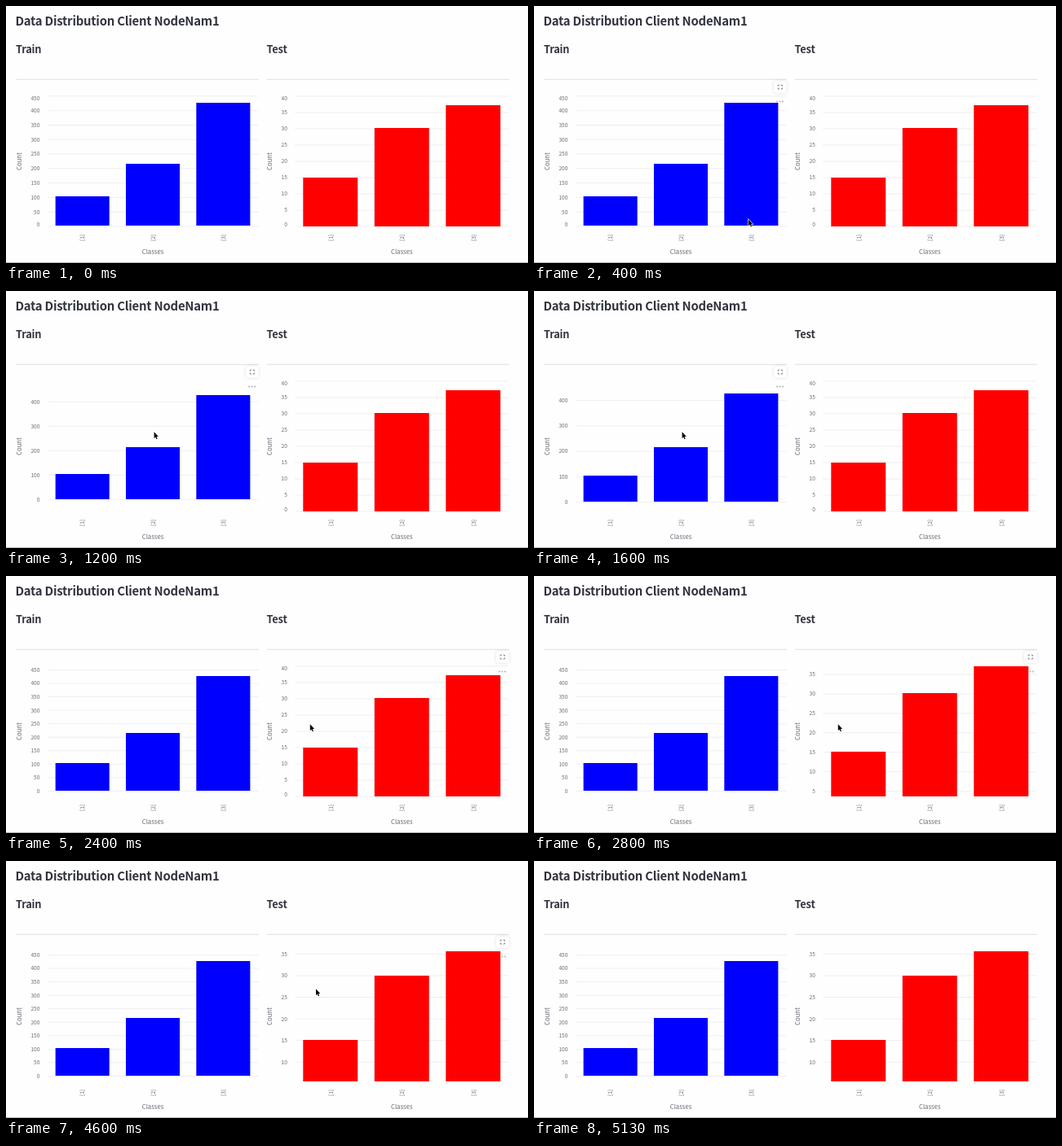
Recreate the animation shown at these times as an HTML page with a canvas. Size 640 by 316 pixels, loop 5.47 s.

```html
<!DOCTYPE html>
<html lang="en">
<head>
<meta charset="utf-8">
<title>Data Distribution</title>
<style>
  html, body { margin: 0; width: 100%; height: 100%; overflow: hidden; background: #fefefe; }
  canvas { display: block; width: 640px; height: 316px; }
</style>
</head>
<body>
<canvas id="stage" width="640" height="316"></canvas>
<script>
const ctx = document.getElementById('stage').getContext('2d');
const LOOP = 5470, TICK = 200;
const FONT = '"Source Sans Pro", "Noto Sans CJK JP", "Noto Sans CJK SC", "Noto Sans CJK KR", "Noto Sans CJK TC", "Noto Sans CJK", "Open Sans", sans-serif';
const INK = '#31333f', SOFT = '#666873', GRID = '#eeeff3';
const TOP = 110.9, BOTTOM = 271;

const progress = (t, from, to) => Math.min(1, Math.max(0, (t - from) / (to - from)));
const smooth = p => p * p * (3 - 2 * p);
const sineOut = p => Math.sin(p * Math.PI / 2);
const powerOut = (p, n) => 1 - (1 - p) ** n;

// zoom keeps the value under the pointer (pivot) at a fixed height (pivotY)
const charts = [
  { title: 'Train', x: 12, end: 310, plot: 50.5, color: '#0000ff',
    max: 450, values: [102, 214, 427], pivot: 264.2, pivotY: 177,
    hoverFrom: 200, hoverTo: 2400, dotsTo: 2400,
    zoom: t => 1 - .174 * smooth(progress(t, 600, 1400) ** .8) + .105 * sineOut(progress(t, 1400, 2000)) },
  { title: 'Test', x: 319.5, end: 617, plot: 354, color: '#ff0000',
    max: 40, values: [15, 30, 37], pivot: 22.375, pivotY: 181.5,
    hoverFrom: 2200, hoverTo: 4800, dotsTo: 5130,
    zoom: t => 1 + .327 * powerOut(progress(t, 2400, 3600), 2.27) }
];

// pointer way points: time, x, y
const path = [
  [200, 209, 300], [400, 263, 262.5], [600, 181.6, 173.3], [1800, 181.6, 173.3],
  [2000, 221, 187], [2400, 372.8, 182.3], [4400, 372.8, 182.3], [4600, 380, 157.3]
];

function pointerAt(t) {
  const i = path.findIndex(([time]) => time >= t);
  if (i < 0 || t < path[0][0]) return null;
  const b = path[i], a = path[Math.max(0, i - 1)];
  const p = a === b ? 0 : progress(t, a[0], b[0]);
  return [a[1] + (b[1] - a[1]) * p, a[2] + (b[2] - a[2]) * p];
}

function text(str, x, y, size, { align = 'left', color = SOFT, weight = 400, turn = 0, spacing = 0 } = {}) {
  ctx.save();
  ctx.translate(x, y);
  ctx.rotate(turn);
  ctx.font = `${weight} ${size}px ${FONT}`;
  ctx.letterSpacing = spacing + 'px';
  ctx.textAlign = align;
  ctx.fillStyle = color;
  ctx.fillText(str, 0, size * .365);
  ctx.restore();
}

function line(x1, x2, y, color, width) {
  ctx.fillStyle = color;
  ctx.fillRect(x1, y - width / 2, x2 - x1, width);
}

// round step from 1, 2, 5 or 10 that gives about seven intervals
function tickStep(span) {
  const raw = span / 7;
  const power = 10 ** Math.floor(Math.log10(raw));
  const e = raw / power;
  return power * (e >= Math.sqrt(50) ? 10 : e >= Math.sqrt(10) ? 5 : e >= Math.SQRT2 ? 2 : 1);
}

function drawDots(x) {
  ctx.fillStyle = '#b4b5ba';
  for (let i = -1; i <= 1; i++) {
    ctx.beginPath();
    ctx.arc(x - .3 + i * 3.5, 117.5, 1.05, 0, 7);
    ctx.fill();
  }
}

function drawIcon(x) {
  const y = 99.6;
  ctx.save();
  ctx.shadowColor = 'rgba(0,0,0,.13)';
  ctx.shadowBlur = 4;
  ctx.fillStyle = '#fff';
  ctx.beginPath();
  ctx.roundRect(x - 7.8, y - 7.2, 15.6, 14.4, 3);
  ctx.fill();
  ctx.shadowColor = 'transparent';
  ctx.strokeStyle = '#7b7e8b';
  ctx.beginPath();
  for (const sx of [-1, 1]) for (const sy of [-1, 1]) {
    ctx.moveTo(x + sx * 2.6, y + sy * .9);
    ctx.lineTo(x + sx * 2.6, y + sy * 2.4);
    ctx.lineTo(x + sx * .9, y + sy * 2.4);
  }
  ctx.stroke();
  ctx.restore();
}

function drawPointer(x, y) {
  const shape = [[0, 0], [0, 7.9], [1.7, 6.3], [2.9, 9], [4.1, 8.5], [3, 5.9], [5.2, 5.7]];
  ctx.beginPath();
  for (const [dx, dy] of shape) ctx.lineTo(x + dx, y + dy);
  ctx.closePath();
  ctx.strokeStyle = '#fff';
  ctx.lineWidth = 1.2;
  ctx.stroke();
  ctx.lineWidth = 1;
  ctx.fillStyle = '#000';
  ctx.fill();
}

function drawChart(c, t, held) {
  const zoom = c.zoom(held);
  const scale = zoom * (BOTTOM - TOP) / c.max;
  const toY = v => c.pivotY - scale * (v - c.pivot);
  const toValue = y => c.pivot + (c.pivotY - y) / scale;

  text(c.title, c.x, 53.2, 12.8, { color: INK, weight: 700, spacing: -.17 });
  line(c.x, c.end, 90.3, '#e3e4e8', 1.2);

  // with no zoom the end labels are pushed inside the plot
  const step = tickStep((BOTTOM - TOP) / scale);
  const first = Math.ceil(toValue(BOTTOM + .5) / step) * step;
  for (let v = first; v <= toValue(TOP - .5); v += step) {
    const y = toY(v);
    const shift = zoom !== 1 ? 0 : v === 0 ? -2.8 : v === c.max ? 2.8 : 0;
    line(c.plot, c.end - .5, y, GRID, 1);
    text(String(v), c.plot - 9.1, y + shift, 6.6, { align: 'right' });
  }

  const iconX = c.end - 8.2;
  const fade = held < c.hoverFrom + TICK ? .5 : 1;
  ctx.globalAlpha = fade;
  if (t >= c.hoverFrom && t < c.dotsTo) drawDots(iconX);
  ctx.globalAlpha = 1;

  const band = (c.end - .5 - c.plot) / c.values.length;
  const width = band * .765;
  const base = Math.min(BOTTOM, Math.floor(toY(0)));
  c.values.forEach((v, i) => {
    const mid = c.plot + band * (i + .5);
    const top = Math.floor(Math.max(TOP + .1, toY(v)));
    ctx.fillStyle = c.color;
    ctx.fillRect(mid - width / 2, top, width, base - top);
    text(`[${i + 1}]`, mid + .4, 285, 6.6, { align: 'center', turn: -Math.PI / 2 });
  });

  text('Count', c.x + 4.1, 191, 7.7, { align: 'center', turn: -Math.PI / 2 });
  text('Classes', c.plot + band * 1.5, 302.3, 7.7, { align: 'center' });
  ctx.globalAlpha = fade;
  if (t >= c.hoverFrom && t < c.hoverTo) drawIcon(iconX);
  ctx.globalAlpha = 1;
}

function frame(t) {
  // motion is sampled five times a second
  const held = Math.floor(t / TICK) * TICK;
  ctx.fillStyle = '#fefefe';
  ctx.fillRect(0, 0, 640, 316);
  text('Data Distribution Client NodeNam1', 11.4, 18.4, 14.85, { color: INK, weight: 700, spacing: -.2 });
  for (const c of charts) drawChart(c, t, held);
  line(0, 640, 315.5, '#bcbcbe', 1);
  const p = pointerAt(held);
  if (p) drawPointer(...p);
}

const start = performance.now();
function loop() {
  frame((performance.now() - start) % LOOP);
  requestAnimationFrame(loop);
}
loop();
</script>
</body>
</html>
```
